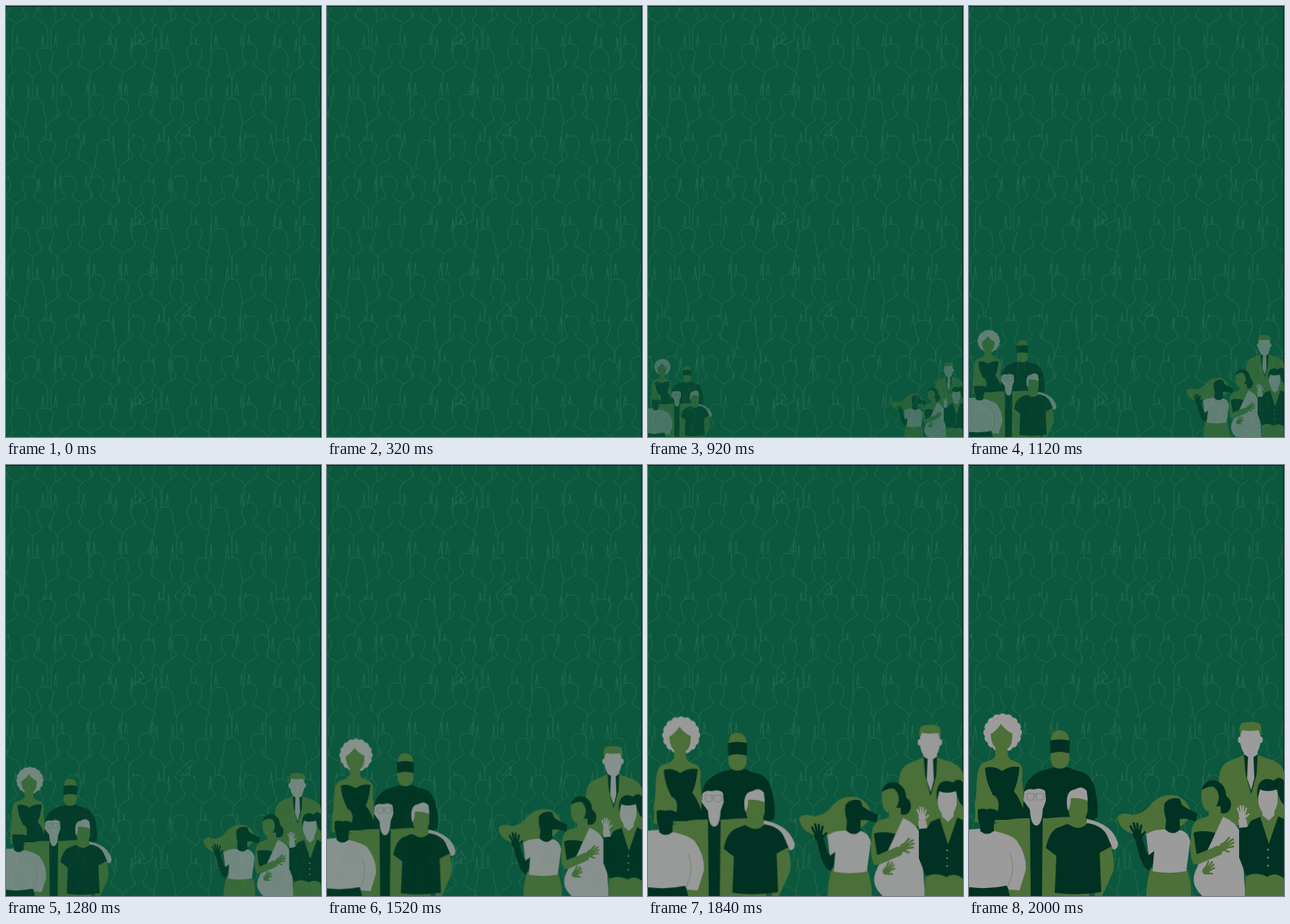
These frames come from a looping animation (393x538 px, 5 s). An HTML page with a canvas:

```html
<!DOCTYPE html>
<html lang="en">
<head>
<meta charset="utf-8">
<title>Crowd</title>
<style>
html, body { margin: 0; width: 100%; height: 100%; overflow: hidden; background: #0b583e; }
canvas { display: block; width: 393px; height: 538px; }
</style>
</head>
<body>
<canvas id="stage"></canvas>
<script>
const W = 393, H = 538, LOOP = 5000, STEP = 40;
const BG = '#0b583e', LINE = '#2c6d52', GRAY = '#9b9b9b', OLIVE = '#4c7038', DARK = '#003122';
const dpr = Math.max(1, window.devicePixelRatio || 1);

function setup(canvas, scale) {
  canvas.width = W * scale;
  canvas.height = H * scale;
  const c = canvas.getContext('2d');
  c.scale(scale, scale);
  c.lineCap = c.lineJoin = 'round';
  return c;
}
function layer(paint) {
  const canvas = document.createElement('canvas');
  paint(setup(canvas, dpr));
  return canvas;
}

// ---------- outlined crowd ----------
// Each entry is a head position and a type: man, woman, long hair, bob, updo.
const ROWS = [
  [47, '18b 49u 86m 126m 166m 198l 235m 266l 304m 340b 376m'],
  [110, '-4m 37l 72m 113m 144w 175m 213w 245w 282l 315m 362l 396m'],
  [162, '19m 51u 84m 124l 163m 194w 228m 265m 305m 343u 375b'],
  [212, '-4m 30m 78m 113m 147w 177w 217m 247w 278m 319m 352b 388m']
];
const PERIOD = 225;

function person(c, x, y, type) {
  const man = type === 'm';
  if (!man) y += 6;
  const sw = man ? 22 : 16, hw = man ? 9 : 8.5, sh = man ? 35 : 33;
  const side = (d, pts) => pts.map((v, i) => i % 2 ? y + v : x + d * v);
  c.beginPath();
  c.moveTo(x - sw, y + 105);
  c.lineTo(x - sw, y + sh + 9);
  c.bezierCurveTo(...side(-1, [sw, sh - 3, 6, 31, 5, 26]));
  c.lineTo(x - 5, y + 22);
  c.bezierCurveTo(...side(-1, [hw, 20, hw + 1, 12, hw, 9]));
  c.bezierCurveTo(...side(-1, [hw, -3, -hw, -3, -hw, 9]));
  c.bezierCurveTo(...side(1, [hw + 1, 12, hw, 20, 5, 22]));
  c.lineTo(x + 5, y + 26);
  c.bezierCurveTo(...side(1, [6, 31, sw, sh - 3, sw, sh + 9]));
  c.lineTo(x + sw, y + 105);
  c.fill();
  c.stroke();

  c.beginPath();
  if (type === 'l') {
    c.moveTo(x - 11, y + 36);
    c.bezierCurveTo(...side(-1, [17, 27, 9, 20, 10, 10]));
    c.bezierCurveTo(...side(-1, [9, -4, -9, -4, -10, 10]));
    c.bezierCurveTo(...side(1, [9, 20, 17, 27, 11, 36]));
  } else if (type === 'b') {
    c.moveTo(x - 10, y + 25);
    c.bezierCurveTo(...side(-1, [15, 19, 11, -2, 0, -1]));
    c.bezierCurveTo(...side(1, [11, -2, 15, 19, 10, 25]));
  } else if (type === 'u') {
    c.ellipse(x, y + 7, 11, 8, 0, Math.PI * .85, Math.PI * 2.15);
  }
  c.fill();
  c.stroke();

  // narrow gaps between arm and waist
  c.beginPath();
  for (const d of [-1, 1]) {
    const ax = x + d * (sw - 6);
    c.moveTo(ax - 2, y + 64);
    c.lineTo(ax, y + sh + 14);
    c.lineTo(ax + 1.5, y + 64);
  }
  c.stroke();
}

const background = layer(c => {
  c.fillStyle = BG;
  c.fillRect(0, 0, W, H);
  c.strokeStyle = LINE;
  c.lineWidth = .75;
  const elbows = {
    47: 'M177 107L183 95L185 108Z',
    110: 'M234 143Q222 147 211 163Q211 168 217 171L235 167M230 151L219 162L229 160',
    212: 'M186 248Q180 257 183 267L160 279L156 274L173 266L166 256M160 266L169 258L172 265'
  };
  for (let k = -1; k < 3; k++) {
    for (const [base, list] of ROWS) {
      const y = base + k * PERIOD;
      c.fillStyle = BG;
      for (const item of list.split(' ')) person(c, parseInt(item), y, item.slice(-1));
      if (elbows[base]) {
        c.save();
        c.translate(0, k * PERIOD);
        c.stroke(new Path2D(elbows[base]));
        c.restore();
      }
    }
  }
  c.fillStyle = '#05291d';
  c.fillRect(0, 0, W, 1);
  c.fillRect(W - 1, 0, 1, H);
});

// ---------- coloured groups ----------
function tools(c) {
  const shape = (color, d) => { c.fillStyle = color; c.fill(new Path2D(d)); };
  const line = (color, w, d) => { c.strokeStyle = color; c.lineWidth = w; c.stroke(new Path2D(d)); };
  const oval = (color, x, y, rx, ry = rx, a = 0) => {
    c.fillStyle = color;
    c.beginPath();
    c.ellipse(x, y, rx, ry, a, 0, 7);
    c.fill();
  };
  const face = (color, x, y, w, h) => shape(color,
    `M${x - w} ${y}V${y + h * .55}Q${x - w * .8} ${y + h} ${x} ${y + h}Q${x + w * .8} ${y + h} ${x + w} ${y + h * .55}V${y}Z`);
  const hand = (color, x, y, size, angle) => {
    c.save();
    c.translate(x, y);
    c.rotate(angle);
    c.scale(size, size);
    oval(color, 0, 0, 5, 6);
    line(color, 2.5, 'M-3 -2L-6 -11M-1 -3L-2 -14M1 -3L2 -13M3 -2L6 -10M3 3L9 -2');
    c.restore();
  };
  return { shape, line, oval, face, hand };
}

const left = layer(c => {
  const { shape, line, oval, face } = tools(c);

  // woman with round hair
  oval(GRAY, 42, 334, 21);
  for (let i = 0; i < 16; i++) {
    const a = i * Math.PI / 8;
    oval(GRAY, 42 + 18.5 * Math.cos(a), 334 + 18.5 * Math.sin(a), 5.6);
  }
  shape(OLIVE, 'M33 346V363Q30 369 19 371Q11 374 10 392L7 446H72L66 392Q69 374 60 371Q49 368 48 362V346Z');
  shape(OLIVE, 'M27 336Q35 331 40 323Q45 331 54 335Q55 356 41 356Q28 355 27 336Z');
  shape(DARK, 'M20 378Q31 375 41 382Q52 375 63 377Q61 397 56 407Q67 420 70 443H28Q32 415 28 408Q21 395 20 378Z');

  // bearded man
  shape(DARK, 'M100 379Q112 374 126 378Q130 381 140 383Q154 387 158 408Q162 425 160 440Q150 448 140 446H66L69 405Q74 384 100 379Z');
  shape(OLIVE, 'M102 346Q102 331 113 331Q125 332 125 346Z');
  shape(DARK, 'M101 344Q113 341 126 344L125 363H102Z');
  shape(OLIVE, 'M102 360Q113 356 125 360V369Q123 379 113 379Q104 379 102 369Z');

  // older man in jacket
  shape(OLIVE, 'M14 460Q35 440 72 441H98Q140 436 160 446L184 472L180 480L150 470V538H40Z');
  shape(GRAY, 'M147 442Q179 448 186 472Q186 480 180 480Q175 465 146 458Z');
  shape(GRAY, 'M0 455L14 454L17 462L0 467Z');
  shape(DARK, 'M76 440H92L91 538H77Z');
  shape(GRAY, 'M69 408Q73 403 81 405Q90 402 95 407L96 419L92 430Q91 450 84 450Q77 450 76 430L68 419Z');
  line('#70806a', .8, 'M73 410H81V417Q77 420 73 417ZM84 410H93V417Q88 420 84 417ZM81 412H84');

  // man in light sweater
  shape(DARK, 'M0 524H47L51 538H0Z');
  shape(GRAY, 'M0 463Q8 458 16 457H32Q51 461 59 468Q72 486 71 505L63 531L50 530L47 525Q25 530 0 527Z');
  line('#70806a', .8, 'M51 484Q59 504 49 525');
  shape(DARK, 'M14 444H31V457Q22 464 14 457Z');
  face(DARK, 22, 424, 11, 30);
  shape(OLIVE, 'M8 432Q4 414 17 412Q22 406 28 411Q40 415 36 432Q29 427 22 430Q14 427 8 432Z');

  // man in dark tee
  shape(OLIVE, 'M158 468L176 474Q183 494 180 507L166 538H157Z');
  shape(DARK, 'M123 448Q136 456 148 447Q166 450 172 462L178 476L163 484L165 533Q135 538 107 534L109 488L96 478Q100 458 110 453Z');
  shape(OLIVE, 'M127 438H146V449Q136 457 126 449Z');
  face(OLIVE, 136, 413, 12, 33);
  shape(GRAY, 'M123 431Q119 406 132 405Q141 399 147 407L148 419Q138 415 127 416Q127 428 123 431Z');
});

const right = layer(c => {
  const { shape, line, oval, face, hand } = tools(c);

  // man in suit
  shape(OLIVE, 'M310 440L312 390Q313 374 326 369L343 362H360L380 369Q391 374 393 383V450H310Z');
  shape(DARK, 'M343 362H360L359 385L352 411L345 385Z');
  shape(GRAY, 'M348 365H355L356 391L352 406L347 391Z');
  shape(GRAY, 'M341 348H360V361L352 367L343 361Z');
  face(GRAY, 351, 328, 12.5, 35);
  oval(GRAY, 338, 343, 2.5, 4);
  oval(GRAY, 364, 343, 2.5, 4);
  shape(OLIVE, 'M338 338Q336 325 341 322Q354 319 363 323Q366 329 364 338L361 331Q350 333 341 331Z');

  // woman with flowing hair
  shape(OLIVE, 'M185 440Q189 432 205 437Q221 434 229 421Q242 409 260 413Q274 419 277 435Q269 455 246 456Q232 463 214 461Q189 461 185 440Z');
  shape(DARK, 'M265 424Q277 432 285 435L283 445Q271 440 263 442Z');
  shape(OLIVE, 'M227 503H271Q278 520 277 538H221Q222 516 227 503Z');
  shape(DARK, 'M207 464L216 465L222 485L230 475L235 489L225 506Q215 505 207 464Z');
  hand(DARK, 210, 462, 1.1, -.15);
  shape(GRAY, 'M221 461Q231 454 245 455L265 456Q274 459 276 470L271 507Q248 511 229 507L231 482L224 487Z');
  shape(DARK, 'M246 440H263V455Q255 464 245 455Z');
  shape(DARK, 'M244 422Q253 413 263 417Q270 431 260 445Q253 451 247 444Q242 434 244 422Z');

  // woman in draped dress
  oval(DARK, 318, 424, 9, 11);
  shape(DARK, 'M290 405Q295 391 308 394Q322 399 321 418L314 430L301 425Z');
  shape(OLIVE, 'M277 463Q277 448 285 443L299 438V426H314V437Q326 441 331 450L328 480L300 492L280 499Q274 484 277 463Z');
  shape(OLIVE, 'M290 406Q299 400 306 402Q315 411 310 423Q306 432 298 432Q289 430 290 406Z');
  shape(DARK, 'M280 459Q290 455 307 459L304 478L284 486Z');
  shape(GRAY, 'M317 439Q334 446 339 460L345 538H291Q276 524 282 508Q287 495 298 480Z');
  shape(OLIVE, 'M278 478L284 487L310 475L318 479L315 486L285 499Q275 494 278 478Z');
  hand(OLIVE, 318, 476, 1, 1.05);
  hand(OLIVE, 296, 506, .9, .75);

  // woman in dark jacket
  shape(GRAY, 'M336 442L346 442L349 457L338 460Z');
  hand(GRAY, 341, 438, .9, -.05);
  shape(OLIVE, 'M346 503H393V538H344Z');
  shape(DARK, 'M337 453L347 452L352 444L366 438H385L393 442V516Q382 507 372 514Q358 507 346 513L337 490Z');
  shape(OLIVE, 'M363 438H386L374 473Z');
  shape(GRAY, 'M367 425H381V437L374 444L366 437Z');
  shape(DARK, 'M378 396Q387 386 393 394V424Q386 419 386 404Z');
  face(GRAY, 373, 402, 12, 34);
  shape(DARK, 'M360 417Q357 394 371 392Q387 391 387 416L384 405Q372 409 363 405Z');
  for (let i = 0; i < 3; i++) oval(GRAY, 373, 480 + i * 10, 1);
});

// ---------- playback ----------
const stage = document.getElementById('stage');
const ctx = setup(stage, dpr);

function drawGroup(img, cornerX, k) {
  ctx.save();
  ctx.globalAlpha = k;
  ctx.translate(cornerX, H);
  ctx.scale(k, k);
  ctx.drawImage(img, -cornerX, -H, W, H);
  ctx.restore();
}

function frame(now) {
  const t = Math.floor((now % LOOP) / STEP) * STEP;
  ctx.drawImage(background, 0, 0, W, H);
  if (t >= 280) {
    const u = Math.min(1, (t - 20) / 1980);
    const k = (1 - Math.cos(Math.PI * u)) / 2;
    drawGroup(left, 0, k);
    drawGroup(right, W, k);
  }
}

const start = performance.now();
function tick() {
  frame(performance.now() - start);
  requestAnimationFrame(tick);
}
tick();
</script>
</body>
</html>
```
